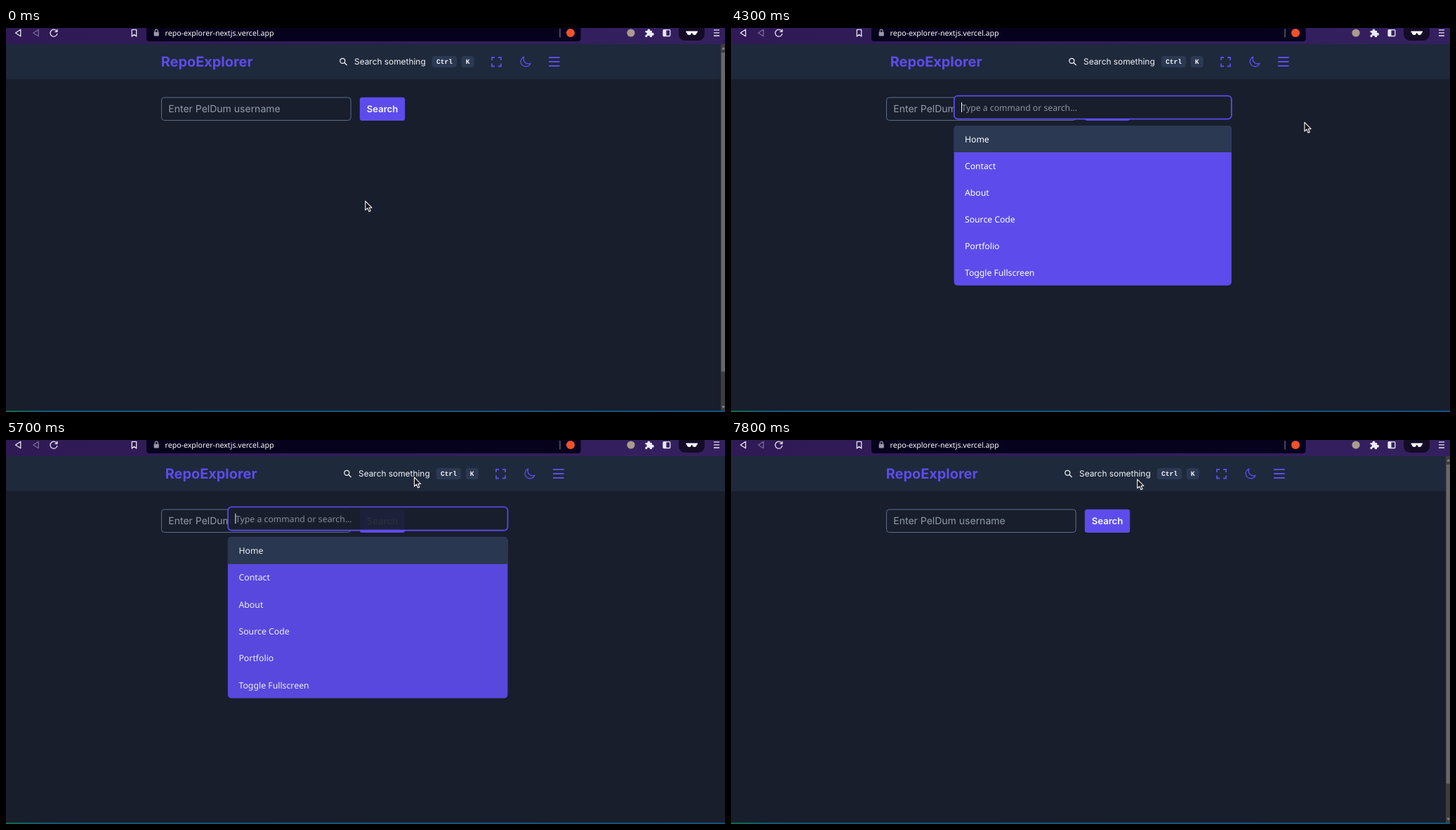
An HTML page that plays this animation: 1024 by 547 pixels, repeating every 8 s.

```html
<!DOCTYPE html>
<html lang="en">
<head>
<meta charset="utf-8">
<title>RepoExplorer command palette</title>
<style>
  html, body { margin: 0; width: 100%; height: 100%; overflow: hidden; background: #181e2c; }
  svg { display: block; width: 100%; height: 100%; }
  text { white-space: pre; text-rendering: geometricPrecision; }
  .geo { font-family: Inter, sans-serif; }
  .ui { font-family: "Noto Sans", "Open Sans", sans-serif; font-size: 12.2px; fill: #fff; }
  .key { font: bold 9.6px "Liberation Mono", monospace; fill: #f4f6fa; text-anchor: middle; }
  .line { fill: none; stroke: #e9e6f2; stroke-width: 1.3; stroke-linejoin: round; }
  .accent { fill: none; stroke: #5d4ceb; stroke-width: 1.8; }
</style>
</head>
<body>
<svg viewBox="0 0 1024 547" preserveAspectRatio="none">
  <defs>
    <linearGradient id="bar">
      <stop offset="0" stop-color="#2f1a55"/>
      <stop offset="1" stop-color="#34205f"/>
    </linearGradient>
    <linearGradient id="edge">
      <stop offset="0" stop-color="#15694f"/>
      <stop offset=".06" stop-color="#125a78"/>
      <stop offset="1" stop-color="#14527f"/>
    </linearGradient>
  </defs>
  <rect width="1024" height="547" fill="#181e2c"/>

  <!-- browser bar -->
  <rect width="1024" height="23" fill="url(#bar)"/>
  <rect x="200" y="-8" width="618.5" height="27" rx="4" fill="#06011d"/>
  <g class="line">
    <path d="M13.5 7L20.8 2.2V11.8Z"/>
    <path d="M46.5 7L39.2 2.2V11.8Z" transform="matrix(-1 0 0 1 85.4 0)" style="stroke:#786a96"/>
    <path d="M72.2 4.4A5 5 0 1 0 73 7.8M73 1.8V5.3H69.4"/>
    <path d="M179.3 2.3H185.7V12L182.5 9.3L179.3 12Z"/>
    <path d="M212.2 6V4.2a2 2 0 0 1 4 0V6" style="stroke:#9a97a6"/>
    <path d="M789 1V13.5" style="stroke:#8b889a;stroke-width:1"/>
    <rect x="936" y="2.7" width="9.8" height="8.8" rx="1"/>
    <path d="M1008 2.8H1016M1008 6.9H1016M1008 11H1016"/>
  </g>
  <rect x="210.6" y="5.8" width="7.2" height="5.6" rx=".8" fill="#9a97a6"/>
  <text class="ui" x="226.5" y="11" style="font-size:10.6px">repo-explorer-nextjs.vercel.app</text>
  <circle cx="804" cy="7" r="6" fill="#f2512c"/>
  <circle cx="890" cy="7" r="5.6" fill="#a99c8d"/>
  <path d="M910.5 4H913.5A2 2 0 1 1 917.3 4H920V7A2 2 0 1 1 920 10.6V13H916.8A1.8 1.8 0 1 0 913.3 13H910.5V9.8A1.8 1.8 0 1 0 910.5 6.4Z" fill="#eceaf3"/>
  <rect x="936" y="2.7" width="4.4" height="8.8" fill="#e9e6f2"/>
  <rect x="958" y="-6" width="37" height="24" rx="9" fill="#140b25"/>
  <path d="M968.5 4.6H985V6.2L983.8 6.7Q983.3 10 980.5 10Q977.8 10 977.3 7H976.2Q975.7 10 973 10Q970.2 10 969.7 6.7L968.5 6.2Z" fill="#fff"/>

  <!-- page header -->
  <rect y="23" width="1024" height="50" fill="#1e293b"/>
  <g id="head">
    <text class="geo" x="220.8" y="55" font-size="19.9" font-weight="700" fill="#5d4ceb">RepoExplorer</text>
    <g class="line" style="stroke:#f2f4f8">
      <circle cx="479.3" cy="46.8" r="3.5"/>
      <path d="M482 49.5L485.6 53"/>
    </g>
    <text class="geo" x="496" y="52.2" font-size="11.9" fill="#f2f4f8">Search something</text>
    <rect x="606.7" y="40" width="35.4" height="16" rx="4" fill="#2c3953"/>
    <text class="key" x="624.4" y="51">Ctrl</text>
    <rect x="648.7" y="40" width="18" height="16" rx="4" fill="#2c3953"/>
    <text class="key" x="657.7" y="51">K</text>
    <g class="accent">
      <path d="M692 46V42H696M701 42H705V46M705 50.5V54.5H701M696 54.5H692V50.5"/>
      <path transform="translate(731 38.4) scale(.78)" stroke-linejoin="round"
        d="M20.4 15.4A9 9 0 0 1 8.6 3.6A9 9 0 0 0 12 21A9 9 0 0 0 20.4 15.4Z"/>
      <path d="M773 42H788.6M773 48H788.6M773 54H788.6"/>
    </g>
  </g>

  <!-- search form -->
  <rect x="221.5" y="99" width="269.6" height="32.5" rx="4" fill="none" stroke="#5c6f87"/>
  <text class="geo" x="231.3" y="119.6" font-size="14" fill="#929baa">Enter PelDum username</text>
  <rect x="503.8" y="98.7" width="64.4" height="33.4" rx="3.5" fill="#5d4ceb"/>
  <text class="geo" x="536" y="119.6" font-size="13.1" font-weight="600" fill="#f6f6fa" text-anchor="middle">Search</text>

  <g id="scroll">
    <rect x="1018" y="23" width="6" height="524" fill="#3d3d40"/>
    <rect x="1018.6" y="35" width="5.4" height="454.5" fill="#676769"/>
    <path d="M1019.3 30.5H1024L1021.7 27ZM1019.3 538.5H1024L1021.7 542Z" fill="#8d8d90"/>
  </g>
  <rect y="545" width="1024" height="2" fill="url(#edge)"/>

  <!-- command palette -->
  <g id="palette">
    <rect x="317.8" y="96.6" width="395" height="33" rx="5" fill="#181e2c" stroke="#5d4ceb" stroke-width="1.8"/>
    <text id="hint" class="ui" x="328.5" y="117.6" style="fill:#8d95a4">Type a command or search…</text>
    <text id="typed" class="ui" x="328" y="117.6"></text>
    <rect id="caret" y="106" width="1" height="14" fill="#fff"/>
    <rect id="sheet" x="317.6" y="139" width="395.2" height="227.7" rx="5" fill="#5d4ceb"/>
    <rect x="317.6" y="139" width="395.2" height="38" rx="5" fill="#2c3953"/>
    <rect id="square" x="317.6" y="170" width="395.2" height="7" fill="#2c3953"/>
    <g id="items"></g>
  </g>

  <path id="mouse" d="M0 0V12.8L3 10L5.2 14.8L7.4 13.8L5.3 9.3H9.2Z" fill="#17171b" stroke="#fff" stroke-width="1.05" stroke-linejoin="round"/>
</svg>
<script>
const LOOP = 8000, STEP = 100;
const POP = 430;                    // length of the palette's entrance
const TYPE = 6700, WORD = "home";
const $ = id => document.getElementById(id);
const [head, scroll, palette, hint, typed, caret, sheet, square, items, mouse] =
  ["head", "scroll", "palette", "hint", "typed", "caret", "sheet", "square", "items", "mouse"].map($);

const home = { x: 511.8, y: 246.6 };
const moves = [
  { start: 700, ms: 100, x: 509.3, y: 246.6 },
  { start: 2100, ms: 100, x: 506.3, y: 246.6 },
  { start: 2300, ms: 300, x: 575, y: 47 },
  { start: 3400, ms: 300, x: 609, y: 89 },
  { start: 3800, ms: 300, x: 805, y: 128 },
  { start: 4200, ms: 100, x: 816.8, y: 134.4 },
  { start: 4800, ms: 600, x: 581.5, y: 53.2 },
  { start: 6100, ms: 200, x: 578.7, y: 56 }
];
const sessions = [
  { open: 2700, leave: 4500, gone: 4800 },
  { open: 5500, leave: 7600, gone: 7800 }
];

const labels = ["Home", "Contact", "About", "Source Code", "Portfolio", "Toggle Fullscreen"];
const rows = labels.map((label, i) => {
  const row = document.createElementNS("http://www.w3.org/2000/svg", "text");
  row.setAttribute("class", "ui");
  row.setAttribute("x", 333);
  row.setAttribute("y", 162.8 + i * 37.95);
  row.textContent = label;
  items.append(row);
  return row;
});

const clamp = (v, lo, hi) => Math.min(hi, Math.max(lo, v));
const smooth = p => p * p * (3 - 2 * p);
const show = (el, on) => el.setAttribute("visibility", on ? "inherit" : "hidden");

function pointerAt(t) {
  let { x, y } = home;
  for (const m of moves) {
    const p = smooth(clamp((t - m.start) / m.ms, 0, 1));
    x += (m.x - x) * p;
    y += (m.y - y) * p;
  }
  return [x, y];
}

// Fades in while growing from .99 to 1.01, then settles at 1; swells again on leaving.
function popAt(t, s) {
  const p = clamp((t - s.open) / POP, 0, 1);
  const alpha = Math.min(1, p * 2);
  if (t >= s.leave) return [1, 1.008];
  return [alpha, p < .5 ? .99 + .02 * alpha : 1.01 - .02 * (p - .5)];
}

function wordAt(t) {
  if (t < TYPE) return "";
  return WORD.slice(0, 1 + Math.max(0, (t - TYPE - 200) / STEP));
}

function render(time) {
  const t = Math.floor(time / STEP) * STEP;
  mouse.setAttribute("transform", `translate(${pointerAt(t)})`);

  const session = sessions.find(s => t > s.open && t < s.gone);
  head.setAttribute("transform", `translate(${session ? 6 : 0} 0)`);
  show(scroll, !session);
  show(palette, session);
  if (!session) return;

  const filtered = t > TYPE;
  const [alpha, scale] = popAt(t, session);
  const cy = filtered ? 136.7 : 231.5;
  palette.setAttribute("opacity", alpha);
  palette.setAttribute("transform", `translate(515.2 ${cy}) scale(${scale}) translate(-515.2 ${-cy})`);

  const word = wordAt(t);
  if (typed.textContent !== word) typed.textContent = word;
  show(hint, !word);
  show(caret, word || (t - session.open + 200) % 1000 >= 500 || t - session.open < 800);
  caret.setAttribute("x", 328 + (word ? typed.getComputedTextLength() : 0));

  show(sheet, !filtered);
  show(square, !filtered);
  rows.forEach((row, i) => show(row, !i || !filtered));
}

const start = performance.now();
function tick() {
  render((performance.now() - start) % LOOP);
  requestAnimationFrame(tick);
}
tick();
</script>
</body>
</html>
```
